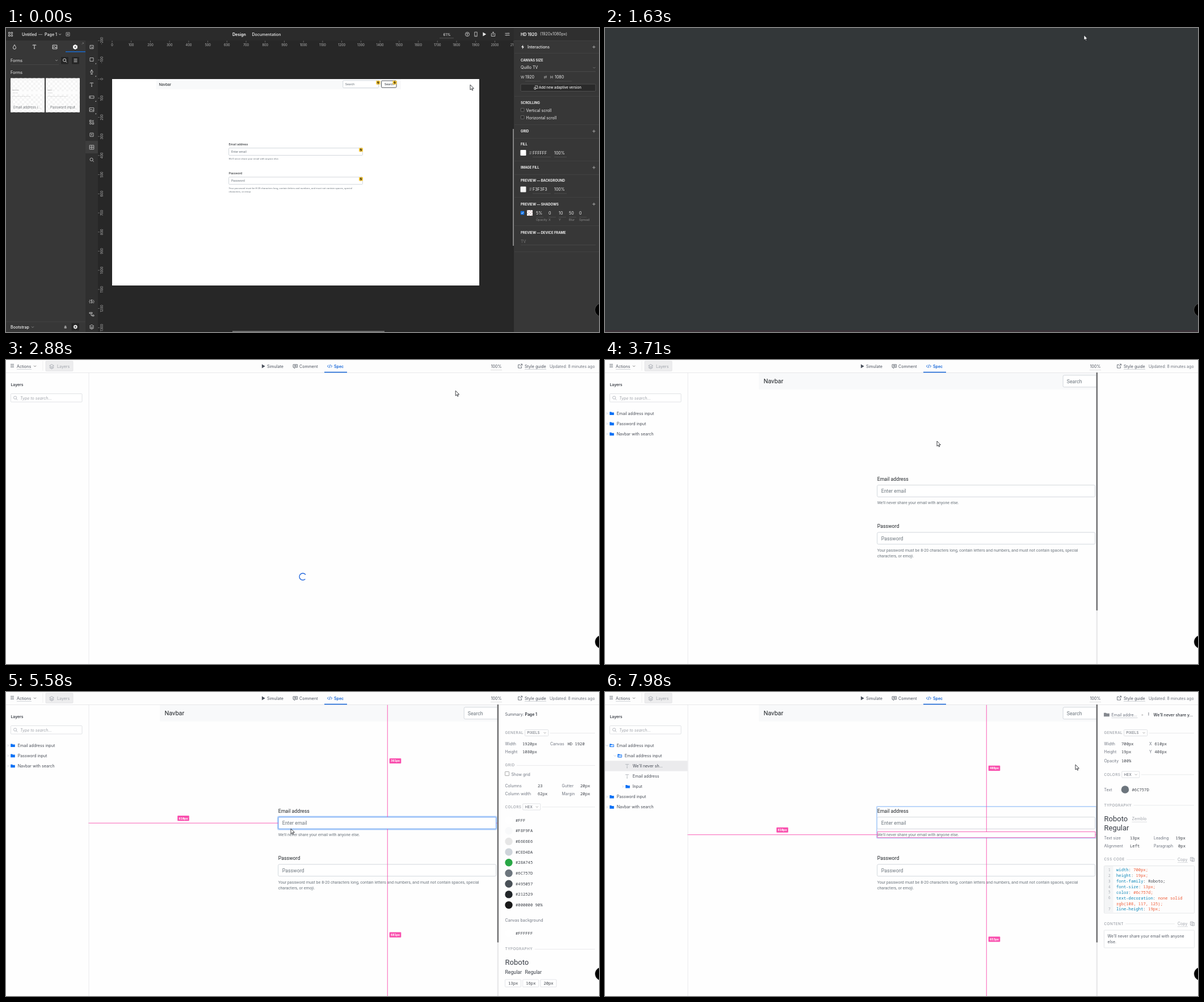
Animation, 1045 px wide and 536 px high, one loop 8 s. Source, as an HTML page with a canvas:

```html
<!DOCTYPE html>
<html lang="en">
<head>
<meta charset="utf-8">
<title>Design spec</title>
<style>
html, body { margin: 0; width: 100%; height: 100%; overflow: hidden; background: #fff; }
canvas { display: block; width: 1045px; height: 536px; }
</style>
</head>
<body>
<canvas id="stage" width="1045" height="536"></canvas>
<script>
const ctx = document.getElementById('stage').getContext('2d');
const LOOP = 8000;
const UI = 'Inter, sans-serif', FORM = 'Roboto, sans-serif', MONO = '"Noto Sans Mono", monospace';
const PINK = '#f94fae', BLUE = '#0f62d6', FOLDER = '#0a70f5';
const HELP = ["We'll never share your email with anyone else."];
const RULES = ['Your password must be 8-20 characters long, contain letters and numbers, and must not contain spaces, special', 'characters, or emoji.'];

// y is the middle of the capitals
function text(s, x, y, color, size = 7.1, { font = UI, weight = 400, align = 'left', style = '', gap = 0 } = {}) {
  ctx.font = `${style} ${weight} ${size}px ${font}`;
  ctx.textAlign = align;
  ctx.letterSpacing = gap + 'px';
  ctx.fillStyle = color;
  ctx.fillText(s, x, y + size * 0.36);
  const w = ctx.measureText(s).width;
  ctx.letterSpacing = '0px';
  return w;
}
const form = (s, x, y, color, size) => text(s, x, y, color, size, { font: FORM });
const mono = (s, x, y, color = '#3c4048', size = 7.2) => text(s, x, y, color, size, { font: MONO });

function rect(x, y, w, h, color) { ctx.fillStyle = color; ctx.fillRect(x, y, w, h); }
function frame(x, y, w, h, color, r = 0, fill, lw = 1) {
  ctx.beginPath();
  ctx.roundRect(x, y, w, h, r);
  if (fill) { ctx.fillStyle = fill; ctx.fill(); }
  if (color) { ctx.strokeStyle = color; ctx.lineWidth = lw; ctx.stroke(); }
}
function disc(x, y, r, color) {
  ctx.beginPath();
  ctx.arc(x, y, r, 0, Math.PI * 2);
  ctx.fillStyle = color;
  ctx.fill();
}
// icon path in coordinates around (x, y)
function icon(d, x, y, color, fill, lw = 0.9) {
  ctx.save();
  ctx.translate(x, y);
  const p = new Path2D(d);
  if (fill) { ctx.fillStyle = color; ctx.fill(p); }
  else { ctx.strokeStyle = color; ctx.lineWidth = lw; ctx.stroke(p); }
  ctx.restore();
}
const I = {
  grid: 'M-3.5-3.5h2.6v2.6h-2.6zM1-3.5h2.6v2.6h-2.6zM-3.5 1h2.6v2.6h-2.6zM1 1h2.6v2.6h-2.6z',
  down: 'M-2-1L0 1L2-1',
  right: 'M-.8-1.6L.8 0L-.8 1.6',
  plus: 'M-2.6 0H2.6M0-2.6V2.6',
  box: 'M-3-3H3V3H-3z',
  drop: 'M0-4C1-2 2.5-.5 2.5 1.3A2.5 2.5 0 0 1-2.5 1.3C-2.5-.5-1-2 0-4z',
  T: 'M-2.8-2.2V-3H2.8V-2.2M0-3V3.2M-1 3.2H1',
  image: 'M-3.8-3.3H3.8V3.3H-3.8zM-3.8 2L-1-1L1 1.5L2.3 0L3.8 2',
  hex: 'M0-4.4L3.8-2.2V2.2L0 4.4L-3.8 2.2V-2.2z',
  search: 'M2.2-.6A2.6 2.6 0 1 1-3-.6A2.6 2.6 0 1 1 2.2-.6M1.5 1.4L3.8 3.6',
  menu: 'M-3-2.4H3M-3 0H3M-3 2.4H3',
  pen: 'M0-4L2.3-.6L1 2.2H-1L-2.3-.6zM0-4V0M-1.8 3.8H1.8',
  input: 'M-4-2H4V2H-4zM-2.4-1V1',
  shapes: 'M-3.6-3.5h2.8v2.8h-2.8zM.8.8h2.8v2.8h-2.8zM.8-3.5L3.6-.8M3.6-3.5L.8-.8M-.8 2.2A1.4 1.4 0 1 1-3.6 2.2A1.4 1.4 0 1 1-.8 2.2',
  bolt: 'M.8-4L-2.4.6H-.2L-.8 4L2.4-.7H.2z',
  blocks: 'M-3.8-3.5H3.8V3.5H-3.8zM0-3.5V3.5M-3.8 0H3.8',
  flow: 'M-4-3H1V-1H-4zM-1-1V2.5H1M1 1.5H4V3.5H1z',
  layers: 'M0-3.8L3.8-1.6L0 .6L-3.8-1.6zM-3.8 .4L0 2.6L3.8 .4M-3.8 2L0 4.2L3.8 2',
  play: 'M-2.6-3.4L3.2 0L-2.6 3.4z',
  phone: 'M-2.2-3.8H2.2V3.8H-2.2zM-.5 2.6H.5',
  share: 'M-1.6-1.2H-3.2V3.5H3.2V-1.2H1.6M0 1.5V-4M-1.6-2.5L0-4L1.6-2.5',
  swap: 'M-4-1.6H1M2.3-1.6H4M-4 1.6H-2M-.6 1.6H4M1.6-2.7V-.5M-1.4.5V2.7',
  link: 'M-2.5-1H2.5L1-2.4M2.5 1H-2.5L-1 2.4',
  lock: 'M-2-.4H2V2.8H-2zM-1.2-.4V-2.2H1.2V-.4',
  comment: 'M-4-3H3.6V2H0L-2 3.7V2H-4zM-2.2-1.4H2M-2.2.4H2',
  code: 'M-2-2.3L-4 0L-2 2.3M2-2.3L4 0L2 2.3M.8-3L-.8 3',
  open: 'M0-2.5H-3.3V3.3H2.5V0M-.5.5L3.6-3.6M1-3.6H3.6V-1',
  copy: 'M-3.4-3.3H1V2.5H-3.4zM1-2H3.4V3.5H-1V2.5M-2-1.5H0M-2 .3H0',
  folder: 'M-3.8-2.8H-.8L0-1.8H3.8V2.8H-3.8z',
  arrow: 'M0 0V9L2.1 7.1L3.5 10.1L4.9 9.4L3.5 6.6H6.4z'
};

function cursor(x, y) {
  ctx.save();
  ctx.lineJoin = 'round';
  icon(I.arrow, x, y, '#fff', true);
  icon(I.arrow, x, y, '#16191d', false, 0.8);
  ctx.restore();
}
function checker(x, y, w, h, s, color) {
  ctx.fillStyle = color;
  for (let j = 0; j * s < h; j++)
    for (let i = j % 2; i * s < w; i += 2)
      ctx.fillRect(x + i * s, y + j * s, Math.min(s, w - i * s), Math.min(s, h - j * s));
}

// the form page at any scale, k is screen pixels per page pixel
function formPage(x0, y0, k) {
  const X = v => x0 + v * k, Y = v => y0 + v * k;
  const field = (label, hint, y, notes) => {
    form(label, X(610), Y(y - 20), '#212529', 16 * k);
    frame(X(610), Y(y), 700 * k, 38 * k, '#ced4da', 4 * k, '#fff', 0.9);
    form(hint, X(623), Y(y + 19.5), '#6c757d', 16 * k);
    notes.forEach((s, i) => form(s, X(610), Y(y + 57 + i * 19), '#6c757d', 13 * k));
  };
  rect(X(230), Y(0), 1280 * k, 54 * k, '#f8f9fa');
  form('Navbar', X(245), Y(27), '#212529', 20 * k);
  frame(X(1207), Y(8), 186 * k, 38 * k, '#ced4da', 4 * k, '#fff', 0.9);
  form('Search', X(1219), Y(27.5), '#6c757d', 16 * k);
  field('Email address', 'Enter email', 361, HELP);
  field('Password', 'Password', 513, RULES);
}

function badge(x, y) {
  rect(x, y, 7, 6.5, '#f5c842');
  icon(I.bolt, x + 3.5, y + 3.2, '#4a3b0a', true);
}

function leftPanel() {
  rect(0, 22, 140, 514, '#373737');
  rect(105, 41.2, 35, 1.3, '#1473e6');
  icon(I.drop, 15, 33.5, '#eee');
  icon(I.T, 50, 33, '#eee');
  icon(I.image, 86, 33.5, '#eee');
  icon(I.hex, 122, 33.5, '#fff', true);
  disc(122, 33.5, 1.2, '#373737');
  icon('M-1.5 1.5L1.5-1.5M-.5-1.5H1.5V.5', 135, 27.5, '#888', false, 0.6);
  text('Forms', 8, 57, '#f2f2f2');
  icon(I.down, 89, 57, '#aaa', false, 0.7);
  rect(8, 64, 85, 0.7, '#4c4c4c');
  frame(97, 51, 13, 12.5, null, 1, '#252525');
  frame(116, 51, 13, 12.5, null, 1, '#252525');
  icon(I.search, 103.5, 57.2, '#eee');
  icon(I.menu, 122.5, 57.2, '#ddd');
  text('Forms', 8, 78, '#f2f2f2');
  [[8, 'Email address i...', 13], [70, 'Password input', 78]].forEach(([x, s, tx]) => {
    frame(x, 88.5, 60, 60, null, 1.5, '#fff');
    checker(x, 88.5, 60, 60, 4, '#f4f4f4');
    rect(x + 2, 111.5, 56, 5, '#fdfdfd');
    form(x < 50 ? 'Email address' : 'Password', x + 3, 109, '#555', 1.8);
    form(x < 50 ? 'Enter email' : 'Password', x + 4, 114, '#999', 1.8);
    form((x < 50 ? HELP : RULES)[0].slice(0, 48), x + 3, 120, '#aaa', 1.6);
    text(s, tx, 139.5, '#75787c', 6.05);
  });
  rect(0, 517.5, 140, 0.8, '#454545');
  text('Bootstrap', 8, 527, '#f2f2f2', 7.1, { weight: 500 });
  icon(I.down, 47, 527.3, '#aaa', false, 0.7);
  icon(I.lock, 104.7, 527, '#999', true);
  frame(115.5, 520.5, 13.5, 13, null, 1, '#262626');
  disc(122.3, 527, 3, '#eee');
  for (let a = 0; a < 8; a++) disc(122.3 + 3 * Math.cos(a * Math.PI / 4), 527 + 3 * Math.sin(a * Math.PI / 4), 0.8, '#eee');
  disc(122.3, 527, 1.2, '#262626');
}

function toolStrip() {
  rect(140, 22, 22, 514, '#2f2f2f');
  rect(140, 199, 22, 22, '#3d3d3d');
  ['box', 'box', 'pen', 'T', 'input', 'image', 'shapes', 'box', 'blocks', 'search'].forEach((n, i) => {
    const y = 33.5 + i * 22.1;
    icon(I[n], 151, y, '#d5d5d5', false, 0.8);
    if (i && i < 6 && i !== 3) icon('M0 0L2 0L2-2z', 157, y + 8, '#bbb', true);
  });
  icon('M-1.2-1.2L1.2 1.2M1.2-.6V1.2H-.6', 151, 33.5, '#d5d5d5', false, 0.7);
  icon('M.4-2L-1.2.3H-.1L-.4 2L1.2-.3H.1z', 151, 188, '#eee', true);
  text('{$}', 151, 482, '#ddd', 7, { align: 'center' });
  icon(I.flow, 151, 504.5, '#d5d5d5', false, 0.8);
  icon(I.layers, 151, 527, '#d5d5d5', false, 0.8);
}

function rulers() {
  const step = 33.72;
  for (let i = 0; i < 22; i++) {
    const x = 187 + i * step;
    rect(x - 0.4, 22.5, 0.8, 3, '#777');
    text(String(i * 100), x, 29.5, '#b5b5b5', 5.6, { align: 'center' });
  }
  for (let i = -2; i < 14; i++) {
    const y = 90 + i * step;
    rect(162, y - 0.4, 3, 0.8, '#777');
    ctx.save();
    ctx.translate(169, y);
    ctx.rotate(-Math.PI / 2);
    text(String(i * 100), 0, 0, '#b5b5b5', 5.6, { align: 'center' });
    ctx.restore();
  }
}

function rightPanel() {
  const head = (s, y, add) => {
    text(s, 907, y, '#f2f2f2', 5.9, { weight: 700 });
    if (add) icon(I.plus, 1036, y, '#bbb', false, 0.8);
  };
  const val = (s, x, y, w) => {
    text(s, x, y, '#f0f0f0');
    rect(x, y + 7, w, 0.7, '#555');
  };
  const swatch = (y, color, hex) => {
    frame(906.5, y - 5, 10, 10, null, 1, color);
    text('#', 922, y, '#999');
    val(hex, 928, y, 32);
    val('100%', 966, y, 22);
  };
  rect(895, 0, 150, 536, '#373737');
  rect(895, 0, 150, 22, '#2f2f2f');
  [22, 44, 120, 170, 194, 234, 258, 298, 348, 394].forEach(y => rect(896, y, 149, 0.8, '#444'));
  text('HD 1920', 907, 11, '#fff', 7.1, { weight: 600 });
  text('(1920x1080px)', 941, 11, '#d8d8d8', 6.9);
  icon(I.bolt, 910.5, 33.5, '#fff', true);
  text('Interactions', 919, 33.5, '#f2f2f2', 6.9, { weight: 500 });
  icon(I.plus, 1036, 33.5, '#bbb', false, 0.8);
  head('CANVAS SIZE', 56.5);
  val('Quillo TV', 907, 69.5, 132);
  icon(I.down, 1036.5, 70, '#999', false, 0.6);
  text('W', 907, 86.5, '#ddd', 6.6);
  val('1920', 915, 86.5, 27);
  icon(I.link, 950.5, 86.5, '#ccc', false, 0.7);
  text('H', 959, 86.5, '#ddd', 6.6);
  val('1080', 967, 86.5, 30);
  frame(907, 99, 132, 12.5, '#555', 1.5, '#2a2a2a', 0.8);
  icon('M-2-3H3V1.5H-.5M-3-.5H-.5V3H-3z', 934, 105, '#eee', false, 0.8);
  text('Add new adaptive version', 939, 105.3, '#f2f2f2', 6.05, { weight: 500 });
  head('SCROLLING', 132);
  ['Vertical scroll', 'Horizontal scroll'].forEach((s, i) => {
    frame(907.2, 141.5 + i * 13, 5.8, 5.8, '#777', 0.5, '#2d2d2d', 0.7);
    text(s, 916.5, 145 + i * 13.2, '#f0f0f0', 7);
  });
  head('GRID', 182, true);
  head('FILL', 204.5);
  swatch(220, '#fff', 'FFFFFF');
  head('IMAGE FILL', 246, true);
  head('PREVIEW — BACKGROUND', 268.5);
  swatch(284.5, '#f3f3f3', 'F3F3F3');
  head('PREVIEW — SHADOWS', 310.5, true);
  frame(906.8, 322.7, 6.5, 6.5, null, 1, '#1473e6');
  icon('M-1.7 0L-.4 1.3L1.8-1.4', 910, 326, '#fff', false, 0.9);
  frame(918, 321, 10, 10, null, 1, '#fff');
  checker(918, 321, 10, 10, 2.5, '#dccccc');
  [['5%', 934, 'Opacity'], ['0', 956, 'X'], ['10', 974, 'Y'], ['50', 992, 'Blur'], ['0', 1010, 'Spread']].forEach(([v, x, s]) => {
    val(v, x, 326, 13);
    text(s, x, 338.5, '#8c8c8c', 5.4);
  });
  head('PREVIEW — DEVICE FRAME', 360.5);
  text('TV', 907, 376, '#777');
  rect(907, 382, 132, 0.7, '#4c4c4c');
}

function editor() {
  rect(0, 0, 1045, 536, '#272727');
  rect(0, 0, 895, 22, '#2b2b2b');
  icon(I.grid, 8, 11, '#ddd', false, 0.8);
  text('Untitled', 28, 11, '#f5f5f5', 7, { weight: 500 });
  text('—', 57, 11, '#ccc');
  text('Page 1', 68, 11, '#f5f5f5', 7.1, { weight: 500 });
  icon(I.down, 95, 11.2, '#ccc', false, 0.8);
  icon(I.box, 109, 11, '#bbb', false, 0.8);
  icon('M-1.5 0H1.5M0-1.5V1.5', 109, 11, '#ddd', false, 0.8);
  text('Design', 399, 11, '#fff', 7.1, { weight: 600 });
  text('Documentation', 433.5, 11, '#f2f2f2', 7, { weight: 500 });
  text('61%', 777, 11.3, '#eee', 6.4, { align: 'center' });
  rect(764, 17.5, 25, 0.7, '#666');
  icon('M3.6 0A3.6 3.6 0 1 1-3.6 0A3.6 3.6 0 1 1 3.6 0M-2-1.2H2M0-1.2V2.5', 813, 11, '#ddd', false, 0.8);
  icon(I.phone, 828, 11, '#ddd', false, 0.8);
  icon(I.play, 843, 11, '#e8e8e8', true);
  icon(I.share, 858.5, 11, '#ddd', false, 0.8);
  icon(I.swap, 883.5, 11, '#ddd', false, 0.9);
  rulers();
  leftPanel();
  toolStrip();

  rect(187, 90, 647, 364, '#fff');
  formPage(187, 90, 0.337);
  frame(661.5, 93, 26.5, 12, '#3d4248', 1.5, '#fff', 0.9);
  form('Search', 667, 99, '#343a40', 5.4);
  [[652.3, 93], [681.5, 93], [622, 211.5], [622, 263]].forEach(p => badge(...p));

  rect(893, 178, 2.4, 206, '#858585');
  rect(399, 534, 268, 2, '#6e6e6e');
  rightPanel();
}

function toolbar() {
  rect(0, 0, 1045, 22, '#fdfdfd');
  rect(0, 22, 1045, 0.8, '#e4e4e6');
  icon(I.menu, 11, 10, '#555b66', false, 0.8);
  text('Actions', 19, 11, '#4b515c', 7.1);
  rect(19, 16.4, 26, 0.6, '#b5b9c0');
  icon(I.down, 51, 10.8, '#666', false, 0.8);
  rect(64.5, 2, 0.8, 17, '#ececee');
  frame(70, 2, 48, 17.5, '#e3e3e5', 1, '#ededee', 0.8);
  icon(I.layers, 80.5, 11.5, '#a5a9b0', false, 0.9);
  text('Layers', 90, 11.5, '#a0a4ab');
  icon(I.play, 453.5, 11, '#4b515c', true);
  text('Simulate', 460, 11, '#4b515c');
  icon(I.comment, 510, 11, '#4b515c', false, 0.8);
  text('Comment', 517, 11, '#4b515c');
  icon(I.code, 570.5, 11, BLUE);
  text('Spec', 578, 11, BLUE, 7, { weight: 600 });
  rect(561, 20.8, 40, 1.5, BLUE);
  text('100%', 864, 11, '#4b515c', 7, { align: 'center' });
  rect(854, 17.5, 20, 0.6, '#ccc');
  icon(I.open, 906, 10.8, '#4b515c', false, 0.8);
  text('Style guide', 914, 11, '#4b515c', 7.1);
  rect(914, 16.4, 38, 0.6, '#b5b9c0');
  text('Updated: 8 minutes ago', 958, 11, '#70757f', 7.05);
}

function tree(open) {
  const row = (i, level, s, isOpen, leaf) => {
    const x = level * 14, y = 94.3 + i * 18.1;
    if (leaf) icon(I.T, x + 11, y, '#aeb2b8', false, 0.8);
    else {
      icon(isOpen ? I.down : I.right, x + 3.5, y, '#b3b7bd', false, 0.6);
      icon(I.folder, x + 12, y, FOLDER, true);
      if (isOpen) rect(x + 9.6, y - 0.6, 5.4, 2.2, '#fff');
    }
    text(s, x + 20.7, y, '#454a54');
  };
  if (!open) return ['Email address input', 'Password input', 'Navbar with search'].forEach((s, i) => row(i, 0, s));
  rect(0, 121.3, 145.5, 18.2, '#ebebed');
  row(0, 0, 'Email address input', true);
  row(1, 1, 'Email address input', true);
  row(2, 2, "We'll never sh...", false, true);
  row(3, 2, 'Email address', false, true);
  row(4, 2, 'Input');
  row(5, 0, 'Password input');
  row(6, 0, 'Navbar with search');
}

function head(s, y, chip, right = 1038) {
  let x = 879 + text(s, 879.5, y, '#8b9099', 6.4, { gap: 0.45 }) + 4;
  if (chip) {
    const w = chip === 'HEX' ? 31 : 41;
    frame(x - 1, y - 5.5, w, 11, '#d9dbdf', 1, '#fff', 0.8);
    text(chip, x + 3, y, '#555b66', 6.2, { gap: 0.2 });
    icon(I.down, x + w - 7, y, '#777', false, 0.6);
    x += w + 2;
  }
  rect(x, y, right - x, 0.7, '#e2e3e6');
}
function pair(label, value, y, x = 879.5, vx = 910) {
  text(label, x, y, '#6f7580', 7);
  mono(value, vx, y);
}

function summary() {
  text('Summary:', 879.5, 40, '#555b66', 6.9);
  text('Page 1', 914.5, 40, '#2b3038', 6.9, { weight: 600 });
  head('GENERAL', 72, 'PIXELS');
  pair('Width', '1920px', 91);
  pair('Canvas', 'HD 1920', 91, 959, 989.5);
  pair('Height', '1080px', 105);
  head('GRID', 129);
  frame(879.5, 140.5, 7, 7, '#999', 0.5, '#fff', 0.8);
  text('Show grid', 890.5, 145, '#6f7580', 7);
  pair('Columns', '23', 165, 879.5, 937);
  pair('Gutter', '20px', 165, 979.5, 1012);
  pair('Column width', '62px', 179, 879.5, 937);
  pair('Margin', '20px', 179, 979.5, 1012);
  head('COLORS', 202.5, 'HEX');
  ['#FFF', '#F8F9FA', '#E6E6E6', '#CED4DA', '#28A745', '#6C757D', '#495057', '#212529', '#000000 90%'].forEach((c, i) => {
    const y = 226 + i * 18.7;
    disc(886, y, 6.7, i === 8 ? '#191919' : c);
    mono(c, 898, y);
  });
  text('Canvas background', 879.5, 402.5, '#6f7580', 7.1);
  disc(886, 425.5, 6.7, '#fff');
  mono('#FFFFFF', 898, 425.5);
  head('TYPOGRAPHY', 453);
  form('Roboto', 879.5, 476.5, '#363b44', 13);
  form('Regular', 879.5, 494, '#363b44', 8.7);
  form('Regular', 914.5, 494, '#363b44', 8.7);
  ['13px', '16px', '20px'].forEach((s, i) => {
    frame(879.5 + i * 31.2, 507, 28, 13, '#dcdee2', 1, '#fff', 0.8);
    mono(s, 885 + i * 31.2, 513.5);
  });
}

function inspector() {
  const copy = y => {
    text('Copy', 1009, y, '#a0a4ab', 7);
    rect(1009, y + 5, 18, 0.6, '#c5c8cd');
    icon(I.copy, 1035, y, '#a0a4ab', false, 0.8);
  };
  ctx.save();
  ctx.translate(884, 40);
  ctx.scale(1.3, 1.2);
  icon(I.folder, 0, 0, '#85898f', true);
  ctx.restore();
  text('Email addre...', 892.5, 40, '#6f7580', 7.1);
  rect(892.5, 45.4, 46, 0.6, '#b5b9c0');
  text('»', 945, 40, '#aaa', 6.5);
  rect(957.5, 36, 0.9, 5.5, '#70757f');
  text("We'll never share y...", 966.5, 40, '#2b3038', 7, { weight: 500 });
  head('GENERAL', 72, 'PIXELS');
  pair('Width', '700px', 91);
  pair('X', '610px', 91, 959, 968.5);
  pair('Height', '19px', 105);
  pair('Y', '408px', 105, 959, 968.5);
  pair('Opacity', '100%', 121.5);
  head('COLORS', 145.5, 'HEX');
  pair('Text', '#6C757D', 172, 879.5, 928.5);
  disc(916.5, 172, 6.8, '#6c757d');
  head('TYPOGRAPHY', 199.5);
  form('Roboto', 879.5, 223, '#363b44', 13);
  form('Regular', 879.5, 239.5, '#363b44', 13);
  text('Zemblo', 928.5, 223.5, '#a0a4ab', 7.3);
  rect(928.5, 228.8, 26.5, 0.6, '#c5c8cd');
  pair('Text size', '13px', 257.5, 879.5, 925);
  pair('Leading', '19px', 257.5, 967, 1005.5);
  pair('Alignment', 'Left', 271, 879.5, 925);
  pair('Paragraph', '0px', 271, 967, 1010);
  head('CSS CODE', 295, null, 1004);
  copy(295);
  frame(879.5, 306.5, 159, 83.5, '#dfe1e4', 1, '#fdfdfd', 0.8);
  rect(880, 307, 15.5, 82.5, '#f4f5f6');
  ['width: 700px;', 'height: 19px;', 'font-family: Roboto;', 'font-size: 13px;', 'color: #6c757d;',
    'text-decoration: none solid', 'rgb(108, 117, 125);', 'line-height: 19px;'].forEach((line, i) => {
    const y = 313.7 + i * 9.88, cut = line.indexOf(':') + 1, cw = 4.32;
    if (i !== 6) mono(String(i < 6 ? i + 1 : 7), 887, y, '#a5a9b0', 6.2);
    mono(line.slice(0, Math.max(0, cut - 1)), 901, y, '#0a86b8');
    if (cut) mono(':', 901 + (cut - 1) * cw, y, '#555');
    mono(line.slice(cut), 901 + cut * cw, y, i === 2 ? '#3c4048' : '#ee5a35');
  });
  head('CONTENT', 408.5, null, 1004);
  copy(408.5);
  frame(879.5, 420, 159, 31, '#dfe1e4', 1, '#fff', 0.8);
  text("We'll never share your email with anyone", 885.5, 430.5, '#555b66', 7);
  text('else.', 885.5, 440.5, '#555b66', 7);
}

const K = 0.5486, OX = 145, OY = 22.5;
function guides(top, height) {
  const y1 = OY + top * K, y2 = y1 + height * K, mid = (y1 + y2) / 2;
  const tag = (s, x, y) => {
    frame(x - 10.3, y - 4.6, 20.6, 9.2, null, 1, PINK);
    text(s, x, y, '#fff', 5.4, { font: MONO, weight: 700, align: 'center' });
  };
  rect(671.8, 22, 0.9, y1 - 22, PINK);
  rect(671.8, y2, 0.9, 536 - y2, PINK);
  rect(145, mid - 0.3, 335, 0.9, PINK);
  rect(864, mid - 0.3, 2, 0.9, PINK);
  tag(top + 'px', 686, (OY + y1) / 2);
  tag(1080 - top - height + 'px', 686, (y2 + OY + 1080 * K) / 2);
  tag('610px', 312.5, mid - 8.3);
}
function hover(top, height) {
  const y = OY + top * K, h = height * K;
  frame(479.2, y - 0.8, 385.4, h + 1.6, '#c6dcfb', 2, null, 3);
  frame(479.7, y, 384, h, '#5b9bf3', 1, null, 0.9);
  guides(top, height);
}

function spinner(t) {
  const a = -Math.PI / 2 + (t - 1870) / 800 * Math.PI * 2;
  ctx.beginPath();
  ctx.arc(523, 382, 6, a + 0.7, a + Math.PI * 2 - 0.7);
  ctx.strokeStyle = '#2468dc';
  ctx.lineWidth = 1.4;
  ctx.stroke();
}

function spec(t) {
  const picked = t >= 6510;
  rect(0, 0, 1045, 536, '#fefefe');
  ctx.save();
  ctx.beginPath();
  ctx.rect(145, 22, 721, 514);
  ctx.clip();
  if (t >= 3580) {
    formPage(OX, OY, K);
    if (picked) {
      frame(479, 202, 387, 55.5, '#bcd7fa', 1, null, 2.2);
      frame(480, 246.4, 384, 10.3, PINK, 0, null, 0.9);
      if (t >= 6820) guides(408, 19);
    } else if (t >= 5960) hover(408, 19);
    else if (t >= 5420) hover(361, 38);
    else if (t >= 4560) hover(329, 24);
  } else spinner(t);
  ctx.restore();
  toolbar();
  rect(145.6, 22, 0.8, 514, '#e6e6e8');
  if (t >= 2750) {
    text('Layers', 8.5, 44, '#3c4048', 6.8, { weight: 600 });
    frame(8.5, 59.5, 125.5, 14.5, '#d9dbdf', 1, '#fff', 0.8);
    icon(I.search, 16.5, 67, '#a5a9b0', false, 0.8);
    text('Type to search...', 25, 67.2, '#a0a4ab', 7, { style: 'italic' });
  }
  if (t >= 3580) {
    tree(picked);
    rect(865.7, 22, 2.4, 514, '#e9e9ea');
    rect(865.7, 22, 2.4, 419.5, '#6c6c6e');
  }
  if (t >= 3870) picked ? inspector() : summary();
}

// time, x, y of the pointer
const PATH = [
  [0, 818, 100], [70, 818, 100], [850, 844, 12.5], [2500, 844, 12.5], [2700, 825, 40], [3480, 585, 143],
  [4400, 585, 143], [4880, 515, 207], [5260, 515, 207], [5560, 502, 241], [5810, 502, 241],
  [6120, 539, 248], [6320, 539, 248], [6360, 541, 249.5], [6740, 541, 249.5], [7200, 978, 238],
  [7510, 946, 225], [7600, 946, 225], [7960, 829, 128], [LOOP, 829, 128]
];
function pointer(t) {
  const i = PATH.findIndex(p => p[0] > t), [t0, x0, y0] = PATH[i - 1], [t1, x1, y1] = PATH[i];
  const u = (t - t0) / (t1 - t0), e = u * u * (3 - 2 * u);
  return [x0 + (x1 - x0) * e, y0 + (y1 - y0) * e];
}

function draw(t) {
  if (t < 1540) editor();
  else if (t < 1870) {
    rect(0, 0, 1045, 536, '#333739');
    rect(0, 533, 1045, 3, '#3b3339');
  } else if (t < 2640) {
    rect(0, 0, 1045, 536, '#fefefe');
    spinner(t);
  } else spec(t);
  disc(1049.5, 497, 12, t < 1870 ? '#555' : '#ccc');
  disc(1049.5, 497, 11.3, '#000');
  cursor(...pointer(t));
}

const start = performance.now();
function tick() {
  draw((performance.now() - start) % LOOP);
  requestAnimationFrame(tick);
}
tick();
</script>
</body>
</html>
```
